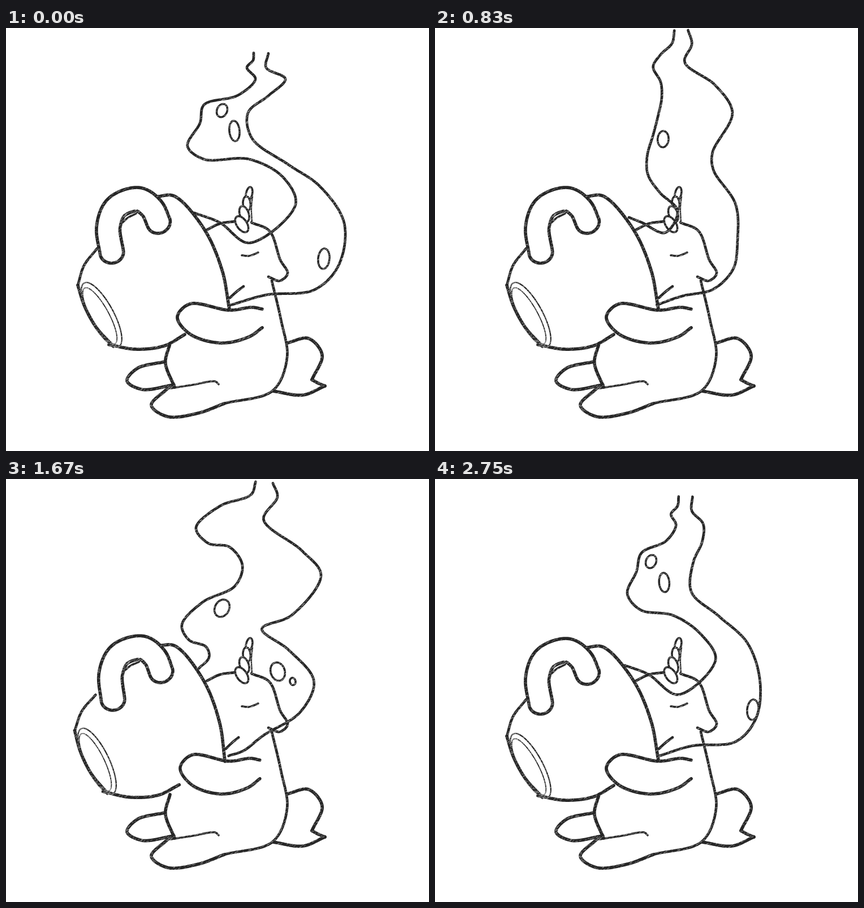
These frames come from a looping animation (748 by 748 pixels, 3000 ms). An HTML page with a canvas:

```html
<!DOCTYPE html>
<html lang="en">
<head>
<meta charset="utf-8">
<title>Unicorn with a steaming mug</title>
<style>
html, body { margin: 0; width: 100%; height: 100%; overflow: hidden; background: #fff; }
canvas { display: block; width: 748px; height: 748px; }
</style>
</head>
<body>
<canvas id="stage" width="748" height="748"></canvas>
<script>
const ctx = document.getElementById('stage').getContext('2d');
const SIZE = 748;
const LOOP = 3000;
const BOLD = 5.7, MEDIUM = 4.7, FINE = 3.6, FAINT = 2.3;

const lerp = (a, b, k) => a + (b - a) * k;
const mix = (a, b, k) => a.map((v, i) => lerp(v, b[i], k));

function randomFrom(seed) {
  let s = seed >>> 0;
  return () => (s = (s * 1664525 + 1013904223) >>> 0) / 4294967296;
}

// Centripetal Catmull-Rom curve through x, y pairs, sampled about every 1.5 px.
function smooth(flat) {
  const p = [];
  for (let i = 0; i < flat.length; i += 2) {
    const q = [flat[i], flat[i + 1]], last = p[p.length - 1];
    if (!last || Math.hypot(q[0] - last[0], q[1] - last[1]) > .5) p.push(q);
  }
  const n = p.length - 1;
  const all = [mix(p[0], p[1], -1), ...p, mix(p[n], p[n - 1], -1)];
  const gap = (a, b) => Math.sqrt(Math.hypot(b[0] - a[0], b[1] - a[1]));
  const out = [];
  for (let i = 1; i <= n; i++) {
    const [a, b, c, d] = all.slice(i - 1, i + 3);
    const g0 = gap(a, b), g1 = gap(b, c), g2 = gap(c, d);
    const slope = (u, v, w, gu, gv) => g1 * ((v - u) / gu - (w - u) / (gu + gv) + (w - v) / gv);
    const steps = Math.max(2, Math.ceil(g1 * g1 / 1.5));
    for (let s = i === 1 ? 0 : 1; s <= steps; s++) {
      const t = s / steps, t2 = t * t, t3 = t2 * t;
      out.push([0, 1].map(k => {
        const m0 = slope(a[k], b[k], c[k], g0, g1);
        const m1 = slope(b[k], c[k], d[k], g1, g2);
        return (2 * t3 - 3 * t2 + 1) * b[k] + (t3 - 2 * t2 + t) * m0
          + (3 * t2 - 2 * t3) * c[k] + (t3 - t2) * m1;
      }));
    }
  }
  return out;
}

function oval([x, y, rx, ry, turn]) {
  const steps = Math.ceil((rx + ry) * 2.1), points = [];
  for (let i = 0; i <= steps; i++) {
    const a = i / steps * 2 * Math.PI;
    const u = Math.cos(a) * rx, v = Math.sin(a) * ry;
    points.push([x + u * Math.cos(turn) - v * Math.sin(turn), y + u * Math.sin(turn) + v * Math.cos(turn)]);
  }
  return points;
}

// Outline of a bent tube: the middle line pushed out to both sides, with flattened round ends.
function tube(middle, radius) {
  const around = (i, angle, flat) => {
    const a = middle[Math.max(0, i - 1)], b = middle[Math.min(middle.length - 1, i + 1)];
    const heading = Math.atan2(b[1] - a[1], b[0] - a[0]);
    const along = Math.cos(angle) * radius * flat, side = Math.sin(angle) * radius;
    return [
      middle[i][0] + along * Math.cos(heading) - side * Math.sin(heading),
      middle[i][1] + along * Math.sin(heading) + side * Math.cos(heading)
    ];
  };
  const last = middle.length - 1, quarter = Math.PI / 2, outline = [];
  for (let i = 0; i <= last; i++) outline.push(around(i, -quarter, 0));
  for (let a = -quarter; a < quarter; a += .08) outline.push(around(last, a, .9));
  for (let i = last; i >= 0; i--) outline.push(around(i, quarter, 0));
  for (let a = quarter; a < 3 * quarter; a += .08) outline.push(around(0, a, .9));
  outline.push(outline[0]);
  return outline;
}

// A dark line with pale slanted flecks, like a soft crayon on paper.
function crayon(points, width, fill) {
  const random = randomFrom(Math.round(points[0][0] * 71 + points[0][1] * 977 + points.length));
  ctx.lineCap = ctx.lineJoin = 'round';
  ctx.strokeStyle = '#262626';
  ctx.lineWidth = width;
  ctx.beginPath();
  points.forEach(([x, y]) => ctx.lineTo(x, y));
  if (fill) {
    ctx.fillStyle = '#fff';
    ctx.fill();
  }
  ctx.stroke();
  ctx.strokeStyle = 'rgba(255,255,255,.5)';
  ctx.lineWidth = .8;
  ctx.beginPath();
  for (const [px, py] of points) {
    const x = px + (random() - .5) * width * 1.1;
    const y = py + (random() - .5) * width * 1.1;
    const reach = .6 + random() * 1.2;
    if (random() < .6) {
      ctx.moveTo(x - reach, y + reach * .5);
      ctx.lineTo(x + reach, y - reach * .5);
    }
  }
  ctx.stroke();
}

const line = (width, ...flat) => crayon(smooth(flat), width);

function drawBody() {
  line(MEDIUM, 355,357, 378,346, 405,342);
  line(MEDIUM, 434,344, 466,359, 485,410, 498,434, 484,447, 464,440);
  line(MEDIUM, 470,447, 486,515, 497,583, 472,641, 386,664);
  line(BOLD, 386,664, 340,681, 285,687, 257,667, 285,638);
  line(FINE, 285,638, 330,631, 370,625, 376,630);
  line(BOLD, 290,558, 282,592, 298,635);
  line(BOLD, 281,590, 232,602, 214,624, 240,639, 297,631);
  line(FINE, 417,402, 430,403, 446,397);
}

function drawTail() {
  line(BOLD, 497,557, 535,549, 559,578, 541,622);
  line(BOLD, 541,622, 552,628, 564,633);
  line(BOLD, 564,633, 525,649, 472,642);
}

function drawHorn() {
  for (let k = 1; k > -.1; k -= 1 / 3) {
    crayon(oval([lerp(417, 430, k), lerp(347, 293, k), lerp(9, 5.5, k), lerp(16, 12, k), lerp(-.6, .2, k)]), FINE, true);
  }
  line(FAINT, 436,298, 434,318, 435,345);
}

function turned(angle, x, y, draw) {
  ctx.save();
  ctx.translate(x, y);
  ctx.rotate(angle);
  ctx.translate(-x, -y);
  draw();
  ctx.restore();
}

function drawMug(tilted) {
  turned(tilted ? .046 : 0, 340, 330, () => {
    line(MEDIUM, 161,390, 138,420, 127,455);
    line(BOLD, 127,455, 139,492, 160,530, 190,563);
    line(BOLD, 182,560, 230,568, 280,562, 316,542);
    line(BOLD, 268,298, 297,297, 350,355, 382,428, 395,497);
    crayon(oval([169, 507, 21, 64, -.5]), FAINT);
    crayon(oval([166, 509, 16, 56, -.5]), FAINT * .8);
    if (tilted) ctx.translate(5, 0);
    crayon(tube(smooth([187,397, 181,352, 195,317, 234,303, 258,319, 270,344]), 20.8), BOLD, true);
    line(FINE, 204,346, 215,336, 230,328);
  });
}

function drawArm(tilted) {
  ctx.save();
  if (tilted) {
    ctx.translate(385, 0);
    ctx.scale(.94, 1);
    ctx.translate(-385, 0);
  }
  line(BOLD, 453,497, 435,494, 395,499, 325,488, 303,511, 325,541, 380,557, 430,546, 453,530);
  if (tilted) ctx.translate(-7, 0);
  line(MEDIUM, 396,477, 408,466, 420,457);
  ctx.restore();
}

// The steam sways through four poses. Outlines run from the top down; bubbles are x, y, rx, ry, turn.
const poses = [
  {
    left: [438,44, 437,57, 426,70, 441,90, 410,119, 350,136, 343,168, 321,209, 350,232, 430,232,
      490,264, 512,312, 430,380, 378,344, 333,327],
    right: [464,45, 460,70, 494,90, 465,119, 428,150, 435,195, 500,242, 555,280, 598,345, 588,420,
      545,463, 460,472, 397,490],
    bubbles: { top: [382,146,9,12,.4], mid: [404,182,9,18,-.1], low: [562,408,10,18,.1] }
  },
  {
    left: [416,5, 413,28, 400,46, 396,64, 406,90, 396,120, 383,155, 379,190, 390,230, 403,260,
      428,294, 464,335, 430,384, 375,348, 342,335],
    right: [438,4, 442,28, 434,58, 488,93, 515,142, 491,210, 505,243, 547,310, 527,380, 526,430,
      505,467, 442,472, 392,490],
    bubbles: { mid: [408,185,9,15,-.05] }
  },
  {
    left: [438,4, 432,25, 398,48, 365,78, 385,107, 411,130, 418,155, 400,185, 345,220, 323,258,
      335,284, 358,300, 360,317, 345,335],
    right: [467,4, 479,28, 457,65, 512,119, 548,165, 490,242, 467,268, 500,315, 551,370, 530,418,
      465,452, 428,478, 393,489],
    bubbles: { mid: [394,220,11,13,.3], low: [480,342,12,16,-.2] }
  },
  {
    left: [445,6, 435,30, 360,47, 307,95, 330,120, 380,111, 418,150, 410,193, 350,216, 299,258,
      312,285, 350,294, 358,314, 338,334],
    right: [477,11, 481,35, 454,78, 535,135, 566,175, 520,240, 438,262, 500,290, 538,345, 510,407,
      445,455, 412,483, 394,490],
    bubbles: { mid: [370,237,14,19,.7], low: [481,339,13,17,-.4], drop: [507,358,5,6.5,-.2] }
  }
];

// [beat, place between the poses]; each place is held until the next.
const sway = [
  [0, 0], [2, .3], [5, .6], [7, 1], [10, 1.33], [12, 1.67], [15, 2],
  [17, 3], [20, 2.5], [22, 2], [25, 1.5], [27, 1], [30, .55], [33, .33]
];
const tiltBeats = [5, 15, 20, 30];
const beatTime = beat => Math.round(beat * 100 / 12) * 10;

function mixLines(a, b, k) {
  const size = Math.max(a.length, b.length);
  const pad = flat => {
    const out = flat.slice();
    while (out.length < size) out.push(...flat.slice(-2));
    return out;
  };
  return mix(pad(a), pad(b), k);
}

function drawSteam(place) {
  const i = Math.min(Math.floor(place), poses.length - 2), k = place - i;
  const a = poses[i], b = poses[i + 1];
  line(MEDIUM, ...mixLines(a.left, b.left, k));
  line(MEDIUM, ...mixLines(a.right, b.right, k));
  const near = k < .5 ? a : b;
  for (const name in near.bubbles) {
    const from = a.bubbles[name] || near.bubbles[name], to = b.bubbles[name] || near.bubbles[name];
    crayon(oval(mix(from, to, k)), FINE);
  }
}

let shown = '';
const begin = performance.now();

function frame() {
  const t = (performance.now() - begin) % LOOP;
  const [, place] = sway.filter(([beat]) => beatTime(beat) <= t).pop();
  const tilted = tiltBeats.some(beat => t >= beatTime(beat) && t < beatTime(beat + 3));
  const state = place + '/' + tilted;
  if (state !== shown) {
    shown = state;
    ctx.fillStyle = '#fff';
    ctx.fillRect(0, 0, SIZE, SIZE);
    drawBody();
    drawTail();
    drawHorn();
    drawMug(tilted);
    drawArm(tilted);
    drawSteam(place);
  }
  requestAnimationFrame(frame);
}
frame();
</script>
</body>
</html>
```
